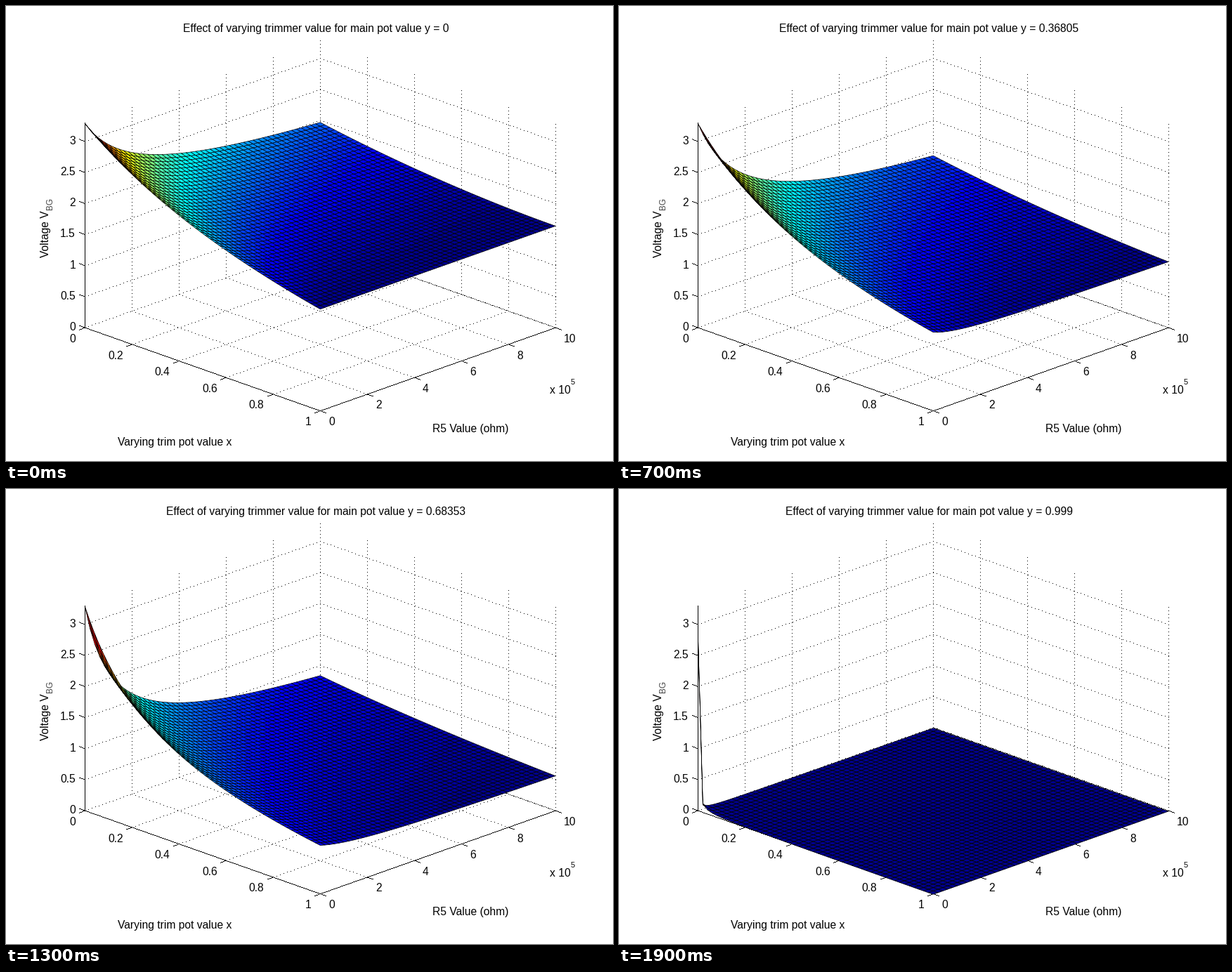
Write a matplotlib script that moves like this. It is 864x648 px and loops after 2 s.

```python
import numpy as np
import matplotlib.pyplot as plt
from matplotlib.animation import FuncAnimation
from matplotlib.collections import PolyCollection

W, H = 864, 648
FRAMES, INTERVAL = 20, 100
N = 50                # mesh points per side
VCC = 3.3
POT = 0.5e6           # main pot and trimmer, ohm
R_MIN, R_MAX = 90, 1e6
FONT = 15.65
DOTS, DENSE = 5, 2    # pixel steps of the dotted lines

plt.rcParams["font.family"] = "Liberation Sans"

# With dpi 72 one point is one pixel.
fig = plt.figure(figsize=(W / 72, H / 72), dpi=72, facecolor="white")
ax = fig.add_axes([0, 0, 1, 1])
ax.set_xlim(0, W)
ax.set_ylim(H, 0)
ax.axis("off")


def project(x, r, z):
    """Unit x, unit r and volts to stage pixels."""
    return 112.5 + 334.75 * (x + r), 459.2 + 118.4 * (x - r) - 88.4 * z


def stroke(x0, y0, x1, y1, step=1):
    """Crisp line of single pixels, dotted when step is above one."""
    n = max(abs(x1 - x0), abs(y1 - y0))
    t = np.arange(0, n + 0.5, step) / n
    ax.plot(np.floor(x0 + (x1 - x0) * t), np.floor(y0 + (y1 - y0) * t),
            ",", color="black")


def line(a, b, step=1):
    stroke(*project(*a), *project(*b), step)


def tick(point, dx, dy):
    x, y = project(*point)
    stroke(x, y, x + dx, y + dy)


def text(x, mid, s, ha="left", size=FONT):
    return ax.text(x + 0.5, mid + 0.5 + 0.355 * size, s, ha=ha,
                   va="baseline", fontsize=size)


def side_text(x, y, s, size, color="black"):
    ax.text(x, y, s, fontsize=size, color=color, rotation=90,
            ha="left", va="baseline", rotation_mode="anchor")


def draw_axes():
    for k in range(6):
        t = k / 5
        line((t, 0, 0), (t, 1, 0), DOTS)
        line((0, t, 0), (1, t, 0), DENSE if k == 5 else DOTS)
        if k:
            line((0, t, 0), (0, t, VCC), DOTS)
            line((t, 1, 0), (t, 1, VCC), DOTS)
    for z in np.arange(0, 3.1, 0.5):
        line((0, 0, z), (0, 1, z), DOTS)
        line((0, 1, z), (1, 1, z), DOTS)
        tick((0, 0, z), -8, -3)
        text(98.5, project(0, 0, z)[1] - 3.2, f"{z:g}", "right")

    line((0, 0, 0), (0, 0, VCC))
    line((0, 0, 0), (1, 0, 0))
    line((1, 0, 0), (1, 1, 0))

    for k in range(6):
        t = k / 5
        tick((t, 0, 0), -8, 3)
        tick((1, t, 0), 8, 3)
        text(99 + 67 * k, 473 + 23.6 * k, f"{t:g}", "right")
        text(458.5 + 67 * k, 591 - 23.6 * k, str(2 * k))

    text(240, 620, "Varying trim pot value x", "center")
    text(661, 601, "R5 Value (ohm)", "center")
    text(773.5, 546, "x 10")
    text(803, 535, "5", size=11)
    side_text(61.5, 357.5, "Voltage V", FONT)
    side_text(66, 290, "BG", 11.8, "#444444")


def voltage(x, r, y):
    low = (1 - y) * POT
    branch = (1 - x) * POT + y * POT
    return VCC * low / (x * POT + r * branch / (r + branch) + low)


def jet(t):
    k = np.clip(np.floor(t * 64), 0, 63)
    rgb = [np.minimum(k - 23, 71 - k),
           np.minimum(k - 7, 55 - k),
           np.minimum(k + 9, 39 - k)]
    return np.clip(np.stack(rgb, axis=-1) / 16, 0, 1)


u = np.linspace(0, 1, N)
X, R = np.meshgrid(u, u, indexing="ij")
OHMS = R_MIN + (R_MAX - R_MIN) * R
I, J = np.indices((N - 1, N - 1))
ORDER = np.argsort((I - J).ravel(), kind="stable")   # far cells first

draw_axes()
surf = PolyCollection([], edgecolors="black", linewidths=0.7,
                      joinstyle="bevel", zorder=3)
ax.add_collection(surf, autolim=False)
title = text(441, 30.8, "", "center")


def update(frame):
    y = 0.999 * frame / (FRAMES - 1)
    z = voltage(X, OHMS, y)
    p = np.stack(project(X, R, z), axis=-1)
    quads = np.stack([p[:-1, :-1], p[1:, :-1], p[1:, 1:], p[:-1, 1:]], axis=2)
    shade = (z[:-1, :-1] - z.min()) / (z.max() - z.min())
    surf.set_verts(quads.reshape(-1, 4, 2)[ORDER])
    surf.set_facecolor(jet(shade.ravel()[ORDER]))
    title.set_text("Effect of varying trimmer value for main pot value "
                   f"y = {y:.5g}")
    return surf, title


anim = FuncAnimation(fig, update, frames=FRAMES, interval=INTERVAL,
                     repeat=True, repeat_delay=0, blit=False)
plt.show()
```
